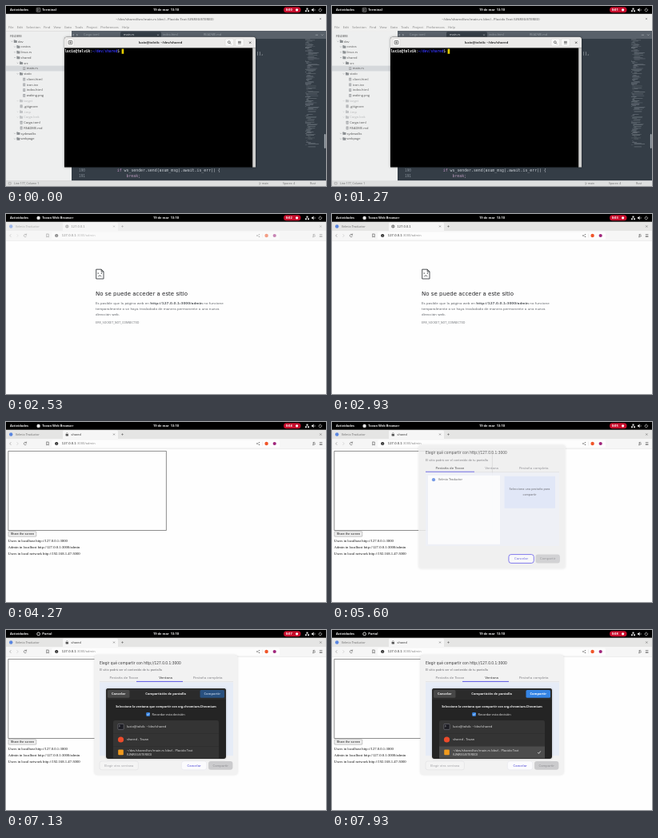
An HTML page with a canvas for the animation above (8000 ms loop, 400 by 225 pixels).

```html
<!DOCTYPE html>
<html lang="es">
<head>
<meta charset="utf-8">
<title>Compartir pantalla</title>
<style>
html, body { margin: 0; width: 100%; height: 100%; overflow: hidden; background: #000; }
canvas { display: block; width: 100vw; height: 100vh; }
</style>
</head>
<body>
<canvas id="stage"></canvas>
<script>
const W = 400, H = 225, LOOP = 8000;
const canvas = document.getElementById('stage');
const ctx = canvas.getContext('2d');

const UI = '"Open Sans", sans-serif';
const SANS = '"DejaVu Sans", sans-serif';
const MONO = '"DejaVu Sans Mono", monospace';
const SERIF = '"Liberation Serif", serif';
const ARIAL = '"Liberation Sans", sans-serif';

const USER = 'lucio@tolvik';
const BROWSER = 'Tovan';
const EDITOR = '~/dev/shared/src/main.rs (dev) - Placido Text';
const OTHER_TAB = 'Velmio Traductor';

const clamp = v => Math.max(0, Math.min(1, v));
const ramp = (t, a, b) => clamp((t - a) / (b - a));
const easeOut = p => 1 - (1 - p) ** 3;

function rect(x, y, w, h, fill) {
  ctx.fillStyle = fill;
  ctx.fillRect(x, y, w, h);
}

function box(x, y, w, h, r, fill, stroke, lw = 0.4) {
  ctx.beginPath();
  ctx.roundRect(x, y, w, h, r);
  if (fill) { ctx.fillStyle = fill; ctx.fill(); }
  if (stroke) { ctx.strokeStyle = stroke; ctx.lineWidth = lw; ctx.stroke(); }
}

function shadowBox(x, y, w, h, r, fill, alpha) {
  ctx.save();
  ctx.shadowColor = `rgba(0,0,0,${alpha})`;
  ctx.shadowBlur = 3;
  box(x, y, w, h, r, fill);
  ctx.restore();
}

function disc(x, y, r, fill) {
  ctx.beginPath();
  ctx.arc(x, y, r, 0, 7);
  ctx.fillStyle = fill;
  ctx.fill();
}

function ring(x, y, r, color, lw = 0.5, a = 0, b = 7) {
  ctx.beginPath();
  ctx.arc(x, y, r, a, b);
  ctx.strokeStyle = color;
  ctx.lineWidth = lw;
  ctx.stroke();
}

function line(color, lw, ...p) {
  ctx.beginPath();
  for (let i = 0; i < p.length; i += 2) ctx.lineTo(p[i], p[i + 1]);
  ctx.strokeStyle = color;
  ctx.lineWidth = lw;
  ctx.stroke();
}

// Text is set large and scaled down so small advances are not rounded.
function text(s, x, y, size, color, font = UI, align = 'left', weight = 400) {
  ctx.save();
  ctx.translate(x, y + size * 0.34);
  ctx.scale(1 / 8, 1 / 8);
  ctx.font = `${weight} ${size * 8}px ${font}`;
  ctx.textAlign = align;
  ctx.fillStyle = color;
  ctx.fillText(s, 0, 0);
  const w = ctx.measureText(s).width / 8;
  ctx.restore();
  return x + w;
}

function cross(x, y, r, color, lw = 0.5) {
  line(color, lw, x - r, y - r, x + r, y + r);
  line(color, lw, x - r, y + r, x + r, y - r);
}

function topBar(app, icon, t) {
  rect(0, 0, W, 9.6, '#000');
  text('Actividades', 5, 4.9, 4, '#f2f2f2', UI, 'left', 700);
  if (icon === 'term') {
    box(38, 2.4, 5, 5, 0.8, '#333', '#ccc');
    line('#ddd', 0.5, 39.2, 3.8, 40.4, 4.8, 39.2, 5.8);
  } else if (icon === 'portal') {
    ring(40.6, 4.9, 1.9, '#ddd', 0.9);
  } else {
    disc(40.6, 4.9, 2.2, '#e8e8e8');
  }
  text(app, 45.3, 4.9, 4, '#f2f2f2', UI, 'left', 700);
  text('19 de mar  13:10', 200, 4.9, 4, '#f2f2f2', UI, 'center', 700);

  const sec = Math.floor((t + 270) / 1000);
  box(347, 1.3, 21.5, 7, 3.5, '#c80d2c');
  text('0:0' + sec, 349.7, 4.9, 4, '#fff', UI, 'left', 700);
  disc(363.6, 4.8, 1.6, '#fff');

  const c = '#e6e6e6';
  rect(375.5, 2.6, 2, 1.8, c);
  rect(374, 5.4, 1.9, 1.8, c);
  rect(377.1, 5.4, 1.9, 1.8, c);
  line(c, 0.4, 375, 5.4, 375, 4.9, 378, 4.9, 378, 5.4);
  ctx.beginPath();
  ctx.moveTo(382, 4); ctx.lineTo(383, 4); ctx.lineTo(384.6, 2.6);
  ctx.lineTo(384.6, 7.2); ctx.lineTo(383, 5.8); ctx.lineTo(382, 5.8);
  ctx.fillStyle = c; ctx.fill();
  ring(384.6, 4.9, 1.6, c, 0.5, -0.8, 0.8);
  ring(392.8, 5, 1.8, c, 0.6, -1, 4.14);
  line(c, 0.6, 392.8, 2.4, 392.8, 4.8);
}

const MENU = ['File', 'Edit', 'Selection', 'Find', 'View', 'Goto', 'Tools', 'Project', 'Preferences', 'Help'];
// name, depth, kind: d = folder, f = file, x = ignored
const TREE = ['dev 0 d', 'costos 1 d', 'linux.rs 1 d', 'shared 1 d', 'src 2 d', 'main.rs 3 f', 'static 2 d',
  'client.html 3 f', 'icon.ico 3 f', 'index.html 3 f', 'waking.png 3 f', 'target 2 x', '.gitignore 2 f',
  '.tmp 2 x', 'Cargo.lock 2 x', 'Cargo.toml 2 f', 'README.md 2 f', 'sydewalks 1 d', 'webpage 1 d'];

function editor(t) {
  const g = Math.round(75 + 10 * ramp(t, 70, 330));
  const ink = `rgb(${g},${g},${g})`;
  rect(0, 9.6, W, 21.8, '#f0f0ef');
  text(EDITOR + ' (UNREGISTERED)', 198.5, 16.2, 4, '#8b8b8b', UI, 'center', 700);
  cross(393, 16, 1.1, '#777');
  let mx = 3;
  for (const s of MENU) mx = text(s, mx, 27.1, 4.1, '#808080') + 4.3;

  rect(0, 31.4, 82, 187, '#eeefef');
  text('FOLDERS', 5, 37.6, 3.3, '#777', UI, 'left', 700);
  TREE.forEach((row, i) => {
    const [name, depth, kind] = row.split(' ');
    const y = 44.2 + i * 6.77, x = 15 + depth * 3.6;
    if (name === 'main.rs') rect(0, y - 3.4, 82, 6.8, '#d5d8db');
    if (kind === 'f') {
      box(x - 4.6, y - 1.9, 3, 3.8, 0.3, '#a4a7aa');
      rect(x - 4, y - 0.7, 1.8, 0.4, '#eee');
      rect(x - 4, y + 0.4, 1.8, 0.4, '#eee');
    } else {
      const c = kind === 'x' ? '#c2c4c6' : '#8d9194';
      box(x - 5.2, y - 1.3, 4, 3, 0.4, c);
      rect(x - 5.2, y - 1.8, 1.8, 1, c);
      line(c, 0.5, x - 8.5, y - 0.5, x - 7.6, y + 0.5, x - 6.7, y - 0.5);
    }
    text(name, x, y, 4, kind === 'x' ? '#b5b6b8' : ink);
  });

  rect(82, 31.4, 318, 187, '#343d46');
  rect(82, 31.4, 318, 9.6, '#59616a');
  box(143, 32.2, 51, 9, [1.5, 1.5, 0, 0], '#343d46');
  text('Cargo.toml', 97, 36.2, 3.8, '#9aa1a8');
  text('main.rs', 147, 36.2, 3.8, '#e4e6e8');
  cross(190, 36.2, 0.8, '#c5c9cd', 0.4);
  text('index.html', 196, 36.2, 3.8, '#9aa1a8');
  text('README.md', 247, 36.2, 3.8, '#9aa1a8');
  line('#c5c9cd', 0.5, 85, 35.2, 83.5, 36.2, 85, 37.2);
  line('#c5c9cd', 0.5, 88, 35.2, 89.5, 36.2, 88, 37.2);
  line('#c5c9cd', 0.5, 386.8, 36.2, 390, 36.2);
  line('#c5c9cd', 0.5, 394, 35.4, 395.4, 36.8, 396.8, 35.4);

  const code = '#c9ced4';
  text('(),', 313, 59, 4.87, code, MONO);
  text('190', 91, 205.8, 4.4, '#87909a', MONO);
  text('191', 91, 212.2, 4.4, '#87909a', MONO);
  text('if', 138.8, 205.8, 4.87, '#c695c6', MONO);
  text('ws_sender.send(axum_msg).await.is_err() {', 147.6, 205.8, 4.87, code, MONO);
  text('break;', 150.5, 212.2, 4.87, '#b99abd', MONO);

  let seed = 11;
  const rnd = () => (seed = seed * 16807 % 2147483647) / 2147483647;
  for (let y = 41.5; y < 176; y += 1.1) {
    const x = 374 + Math.floor(rnd() * 4) * 1.2;
    rect(x, y, rnd() * 14, 0.5, `rgba(200,208,215,${0.25 + rnd() * 0.35})`);
  }
  box(397.8, 160, 1.8, 18, 0.9, '#a3aab0');

  rect(0, 218.3, W, 6.7, '#dedfdf');
  box(3.2, 220.4, 3, 2.6, 0.3, null, '#777');
  text('Line 177, Column 1', 10, 221.7, 3.5, '#6c6c6c');
  text('main', 320, 221.7, 3.5, '#6c6c6c');
  line('#777', 0.4, 317, 220, 317, 223.4, 318.6, 221);
  text('Spaces: 4', 346, 221.7, 3.5, '#6c6c6c');
  text('Rust', 380, 221.7, 3.5, '#6c6c6c');
}

function terminal(t) {
  shadowBox(73, 38.7, 239, 162.9, [3, 3, 0, 0], '#000', 0.4);
  box(73, 38.7, 239, 13.5, [3, 3, 0, 0], '#ebeae9');
  rect(73, 51.8, 239, 0.4, '#c8c6c4');
  rect(308.2, 52.2, 3.8, 149.4, '#cfcfce');
  const c = '#333';
  box(76, 41, 9, 9.2, 1.5, '#f8f8f7', '#cfcdcb');
  box(78.2, 43.5, 4.6, 4.2, 0.6, null, c, 0.6);
  line(c, 0.6, 79.3, 45.6, 81.7, 45.6);
  line(c, 0.6, 80.5, 44.4, 80.5, 46.8);
  text(USER + ': ~/dev/shared', 193, 45.9, 4.1, '#2a2a2a', UI, 'center', 700);
  box(274, 41, 10.6, 9.2, 1.5, '#f8f8f7', '#cfcdcb');
  ring(278.8, 45.2, 1.4, c, 0.6);
  line(c, 0.7, 279.8, 46.2, 281.1, 47.5);
  box(286.6, 41, 10.6, 9.2, 1.5, '#f8f8f7', '#cfcdcb');
  for (let i = 0; i < 3; i++) rect(290, 43.9 + i * 1.4, 3.8, 0.6, c);
  cross(305.2, 45.7, 1.1, c, 0.7);

  const cw = 2.637, x0 = 73.4, lh = 6.15, fs = 4.38;
  const out = '#dfdcae';
  const put = (s, col, row, color = '#e8e8e8', weight = 400) =>
    text(s, x0 + col * cw, 56.7 + row * lh, fs, color, MONO, 'left', weight);
  put(USER, 0, 0, '#fff', 700);
  put(':', 12, 0);
  put('~/dev/shared', 13, 0, '#2f2fe0', 700);
  put('$', 25, 0);
  if (t >= 1870) put('cargo run', 27, 0, out);
  let col = 27, row = 0;
  if (t >= 1930) { col = 0; row = 1; }
  else if (t >= 1870) col = 36;
  if (t >= 2270) {
    put('Finished', 4, 1, '#fff', 700);
    put('`dev` profile [unoptimized + debuginfo] target(s) in 0.10s', 13, 1, out);
    put('Running', 5, 2, '#fff', 700);
    put('`target/debug/shared`', 13, 2, out);
    row = 3;
  }
  rect(x0 + col * cw, 53.6 + row * lh, cw, lh, '#e6cf00');
}

function browser(t) {
  const loading = t >= 3730 && t < 4130;
  const loaded = t >= 3930;
  rect(0, 9.6, W, 215.4, '#fefefe');
  rect(0, 9.6, W, 11.6, '#e5e5e4');
  box(71, 10.6, 69, 11, [1.5, 1.5, 0, 0], '#f6f6f6');
  disc(6.2, 15.5, 2.2, '#5a86e0');
  text(OTHER_TAB, 11.8, 15.4, 3.55, '#6f6f6f', SANS);
  if (loading) ring(76.3, 15.5, 1.9, '#4d6fd0', 0.6, t / 90, t / 90 + 4);
  else if (loaded) {
    ring(76.3, 14.7, 1.1, '#555', 0.5, 3.1, 6.3);
    box(74.6, 15, 3.4, 2.4, 0.4, '#555');
  } else {
    disc(76.3, 15.5, 2.1, '#666');
    line('#eee', 0.4, 74.4, 15.5, 78.2, 15.5);
    ring(76.3, 15.5, 1, '#eee', 0.3);
  }
  text(loaded ? 'shared' : '127.0.0.1', 81.6, 15.4, 3.55, '#333', SANS);
  cross(135, 15.5, 0.9, '#555');
  line('#555', 0.5, 144.2, 15.5, 146.8, 15.5);
  line('#555', 0.5, 145.5, 14.2, 145.5, 16.8);
  cross(393.3, 15.5, 1.1, '#555');

  rect(0, 21.2, W, 12.2, '#f6f6f6');
  rect(0, 33, W, 0.4, '#dadada');
  box(57, 22.6, 285, 9.2, 1.6, '#fdfdfd');
  line('#888', 0.6, 6.3, 25.2, 4.6, 27, 6.3, 28.8);
  line('#c4c4c4', 0.6, 13.6, 25.2, 15.3, 27, 13.6, 28.8);
  if (loading) cross(24, 27, 1.5, '#555', 0.6);
  else {
    ring(24, 27, 1.7, '#555', 0.6, 0.4, 5.5);
    line('#555', 0.6, 25.7, 24.6, 25.5, 26.2, 23.9, 26.1);
  }
  line('#555', 0.6, 50.7, 25, 53.3, 25, 53.3, 29, 52, 28, 50.7, 29, 50.7, 24.7);
  disc(63.2, 27, 2.1, '#2b2b2b');
  rect(62.9, 26.6, 0.6, 1.5, '#fff');
  const x = text('127.0.0.1', 69.8, 27, 3.75, '#222', SANS);
  text(':3000/admin', x, 27, 3.75, '#8c8c8c', SANS);
  disc(313.8, 27, 0.7, '#777');
  disc(316.6, 25.6, 0.7, '#777');
  disc(316.6, 28.4, 0.7, '#777');
  line('#777', 0.4, 316.6, 25.6, 313.8, 27, 316.6, 28.4);
  rect(320, 24.5, 0.3, 5, '#ccc');
  disc(325.6, 27, 2.2, '#f0562a');
  disc(335.7, 27, 2.1, '#a0267c');
  line('#555', 0.6, 383.3, 26, 386.6, 26);
  line('#555', 0.6, 385, 24.8, 383.6, 29, 387, 27.4);
  for (let i = 0; i < 3; i++) rect(391.8, 25.4 + i * 1.5, 3.6, 0.6, '#555');

  if (loaded) sharedPage(t);
  else if (t < 3800) errorPage();
  const veil = 0.45 * (1 - ramp(t, 2600, 2930));
  if (veil > 0) rect(0, 9.6, W, 23.8, `rgba(246,246,246,${veil})`);
}

function errorPage() {
  const c = '#3c4043';
  line(c, 0.9, 119.2, 69.2, 112.7, 69.2, 112.7, 81, 122, 81, 122, 72, 119.2, 69.2, 119.2, 72, 122, 72);
  rect(114.6, 73.5, 1.2, 1.2, c);
  rect(118.8, 73.5, 1.2, 1.2, c);
  ring(117.3, 78.8, 1.9, c, 0.8, 3.4, 6.02);
  text('No se puede acceder a este sitio', 112, 99.3, 7.03, '#202124', SANS);
  const g = '#5f6368', s = 4.15;
  let x = text('Es posible que la página web en ', 112, 111.6, s, g, SANS);
  x = text('http://127.0.0.1:3000/admin', x, 111.6, s, g, SANS, 'left', 700);
  text(' no funcione', x, 111.6, s, g, SANS);
  text('temporalmente o se haya trasladado de manera permanente a una nueva', 112, 118.7, s, g, SANS);
  text('dirección web.', 112, 125.8, s, g, SANS);
  text('ERR_SOCKET_NOT_CONNECTED', 112, 136.2, 3.4, '#777a7e', SANS);
}

function sharedPage(t) {
  box(2.8, 36.4, 197.6, 99.1, 0, null, '#444', 0.6);
  const down = t >= 5000 && t < 5400;
  box(3, 136.8, 34.8, 6.4, 0.7, down ? '#dcdcdc' : '#efefef', '#767676');
  text('Share the screen', 20.4, 140, 3.85, '#111', ARIAL, 'center');
  text('Users in localhost http://127.0.0.1:3000', 2.6, 148.5, 4.69, '#111', SERIF);
  text('Admin in localhost http://127.0.0.1:3000/admin', 2.6, 156.6, 4.69, '#111', SERIF);
  text('Users in local network http://192.168.1.47:3000', 2.6, 164.8, 4.69, '#111', SERIF);
}

function shareDialog(t) {
  const p = ramp(t, 5400, 5800), e = 2 * (1 - p);
  const windows = t >= 6200;
  ctx.save();
  ctx.globalAlpha = 1 - (1 - p) ** 2.5;
  const o = 2.5 * e;
  shadowBox(110.5 - o, 31 - o, 179 + 2 * o, 150 + 2 * o, 4, '#f2f2f2', 0.1);

  ctx.save();
  ctx.translate(0, -2.2 * e);
  text('Elegir qué compartir con http://127.0.0.1:3000', 117, 41.2, 4.35, '#3a3a3c', SANS);
  text('El sitio podrá ver el contenido de tu pantalla', 117, 50, 3.5, '#6a6a6e', SANS);
  const on = '#333', off = '#808085';
  text('Pestaña de ' + BROWSER, 147.5, 60, 4.1, windows ? off : on, SANS, 'center');
  text('Ventana', 199.6, 60, 4.1, windows ? on : off, SANS, 'center');
  text('Pestaña completa', 252.3, 60, 4.1, off, SANS, 'center');
  rect(117, 64.4, 167, 0.4, '#cfcfd4');
  rect(windows ? 163 : 117, 63.9, windows ? 58 : 61, 1, '#5d58e6');
  if (windows) rect(117, 65.5, 167, 91.7, '#e6ecf7');
  else {
    rect(117, 65.5, 167, 91.7, '#eef1f8');
    rect(120, 69, 90, 86, '#fefefe');
    disc(127, 74.4, 2.1, '#5a86e0');
    text(OTHER_TAB, 132.8, 74.4, 3.6, '#444', SANS);
    rect(215.5, 70, 63.5, 40, '#dfe6f8');
    text('Selecciona una pestaña para', 247, 85.6, 3.5, '#55555a', SANS, 'center');
    text('compartir', 247, 92.8, 3.5, '#55555a', SANS, 'center');
  }
  ctx.restore();

  if (windows) {
    box(117, 164, 48.4, 10.8, 2.6, '#f4f4f4', '#d4d4d8');
    text('Elegir otra ventana', 141.2, 169.3, 3.8, '#a2a2a6', SANS, 'center');
  }
  ctx.translate(1.5 * e, 1.6 * e);
  const focus = t < 6900;
  box(219.4, 164, 31.4, 10.8, 3, '#fbfbfd', focus ? '#6b62ea' : '#e2e2ea', focus ? 1 : 0.5);
  text('Cancelar', 235.1, 169.3, 3.85, '#4b45d6', SANS, 'center');
  box(253, 164, 30.4, 10.8, 3, '#cbcbcd');
  text('Compartir', 268.2, 169.3, 3.85, '#8e8e92', SANS, 'center');
  ctx.restore();
}

function portal(t) {
  const p = easeOut(ramp(t, 6730, 7070));
  if (!p) return;
  const hover = t >= 7730 ? 2 : t >= 7530 ? 1 : t >= 7330 ? 0 : -1;
  const picked = t >= 7800;
  ctx.save();
  ctx.globalAlpha = p;
  const s = 0.85 + 0.15 * p;
  ctx.translate(200, 117);
  ctx.scale(s, s);
  ctx.translate(-200, -117);
  shadowBox(125, 73, 150, 88, 3, '#242424', 0.2);
  box(125, 73, 150, 14, [3, 3, 0, 0], '#2b2b2b');
  box(127, 75, 27.5, 9.8, 1.6, '#474747');
  text('Cancelar', 140.7, 79.9, 4, '#f2f2f2', UI, 'center', 700);
  text('Compartición de pantalla', 199.5, 79.9, 4, '#f2f2f2', UI, 'center', 700);
  box(242.5, 75, 30.5, 9.8, 1.6, picked ? '#3584e4' : '#28507f');
  text('Compartir', 257.8, 79.9, 4, picked ? '#fff' : '#a9bdd6', UI, 'center', 700);
  text('Seleccione la ventana que compartir con org.chromium.Chromium', 200, 95.5, 3.8, '#f4f4f4', UI, 'center', 700);
  box(175.2, 103, 4.8, 4.8, 1, '#3584e4');
  line('#fff', 0.7, 176.3, 105.4, 177.3, 106.5, 179, 104.3);
  text('Recordar esta decisión', 182.5, 105.4, 3.9, '#eee');

  box(134, 113, 132, 47.2, [2.5, 2.5, 0, 0], '#343434');
  if (hover >= 0) {
    box(134, 113 + hover * 16, 132, hover === 2 ? 15.2 : 16, hover ? 0 : [2.5, 2.5, 0, 0], picked ? '#4c4c4c' : '#404040');
  }
  rect(134, 129, 132, 0.3, '#222');
  rect(134, 145, 132, 0.3, '#222');
  box(139.8, 117.4, 7.4, 7, 1, '#1d1d24', '#8a8a92', 0.5);
  line('#ddd', 0.5, 141.2, 119, 142.4, 120, 141.2, 121);
  disc(143.5, 137, 3.6, '#ec4b2b');
  box(140.2, 149.6, 6.6, 6.6, 1, '#f09a1e');
  text(USER + ': ~/dev/shared', 151, 121, 4, '#e9e9e9');
  text('shared - ' + BROWSER, 151, 137, 4, '#e9e9e9');
  text(EDITOR, 151, 150.5, 4, '#e9e9e9');
  text('(UNREGISTERED)', 151, 156, 4, '#e9e9e9');
  if (picked) line('#fff', 0.7, 257.2, 153, 258.5, 154.4, 260.8, 151.4);
  ctx.restore();
}

function draw(t) {
  if (t < 2530) {
    editor(t);
    terminal(t);
    topBar('Terminal', 'term', t);
    return;
  }
  browser(t);
  if (t >= 5400) shareDialog(t);
  portal(t);
  if (t >= 6470) topBar('Portal', 'portal', t);
  else topBar(BROWSER + ' Web Browser', 'web', t);
}

function resize() {
  const d = devicePixelRatio || 1;
  canvas.width = Math.round(innerWidth * d);
  canvas.height = Math.round(innerHeight * d);
}
addEventListener('resize', resize);
resize();

const start = performance.now();
function tick() {
  ctx.setTransform(canvas.width / W, 0, 0, canvas.height / H, 0, 0);
  draw((performance.now() - start) % LOOP);
  requestAnimationFrame(tick);
}
tick();
</script>
</body>
</html>
```
